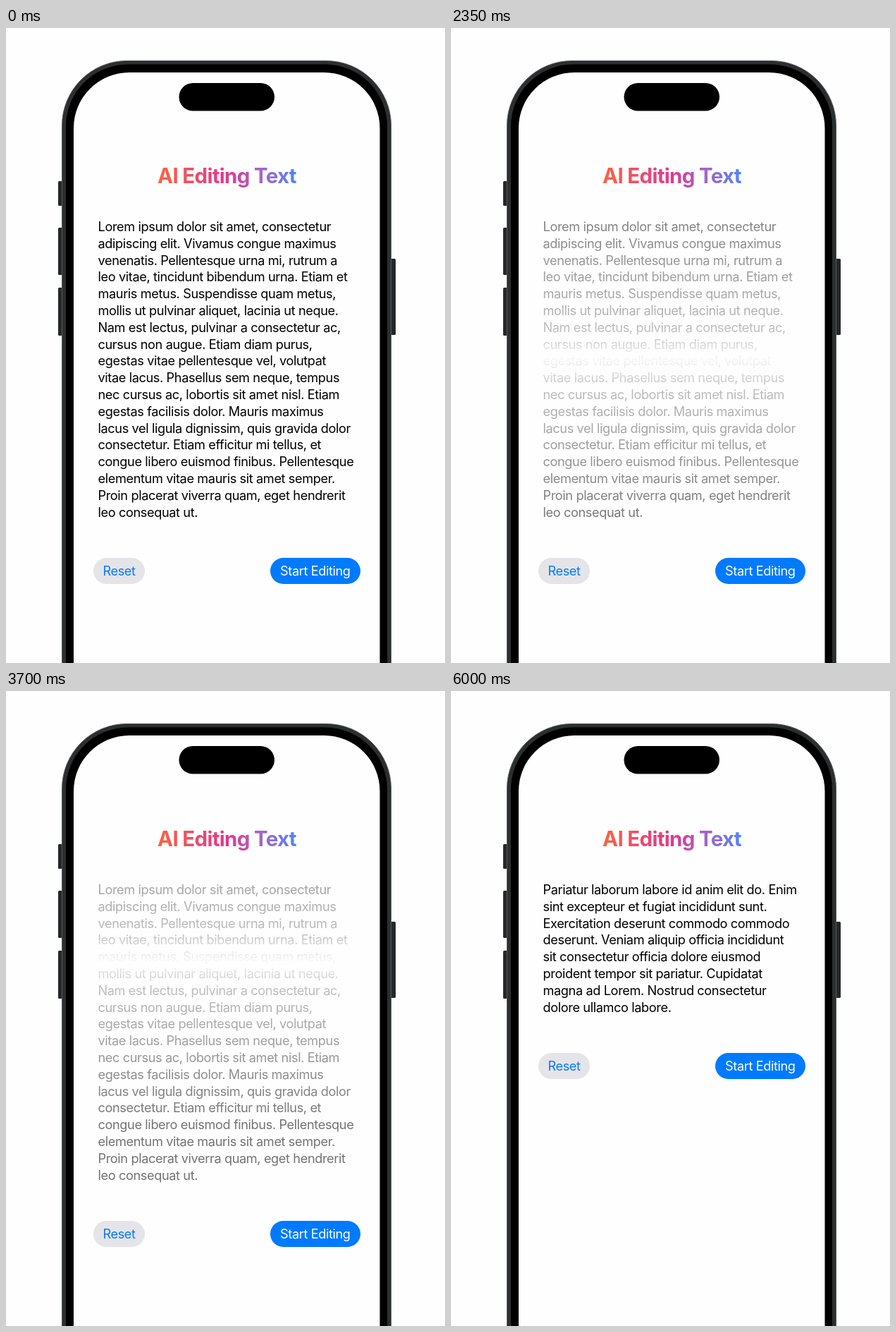
Recreate the animation shown at these times as an HTML page. Size 623 by 900 pixels, loop 6.15 s.

```html
<!DOCTYPE html>
<html lang="en">
<head>
<meta charset="utf-8">
<title>AI Editing Text</title>
<style>
  html, body { margin: 0; width: 100%; height: 100%; overflow: hidden; background: #fefefe; }
  svg { display: block; width: 623px; height: 900px; }
  text { font: 18.2px Inter, "Liberation Sans", sans-serif; letter-spacing: -.4px; }
  .title { font-size: 29.5px; font-weight: 700; letter-spacing: -.7px; }
  .mid { text-anchor: middle; }
</style>
</head>
<body>
<svg viewBox="0 0 623 900">
  <defs>
    <linearGradient id="rainbow" gradientUnits="userSpaceOnUse" x1="213" x2="414" y1="0" y2="0">
      <stop offset="0" stop-color="#fb6540"/>
      <stop offset=".5" stop-color="#e0388f"/>
      <stop offset=".74" stop-color="#a465c4"/>
      <stop offset="1" stop-color="#4b86fb"/>
    </linearGradient>
    <linearGradient id="shimmer" gradientUnits="userSpaceOnUse" x1="0" x2="0" y1="-230" y2="230"/>
    <radialGradient id="reveal" gradientUnits="userSpaceOnUse" cx="320" cy="-910" r="910"/>
  </defs>

  <g fill="#25282a">
    <rect x="74" y="217" width="8" height="35" rx="1.5"/>
    <rect x="74" y="283" width="8" height="67" rx="1.5"/>
    <rect x="74" y="368" width="8" height="68" rx="1.5"/>
    <rect x="545" y="327" width="8" height="108" rx="1.5"/>
  </g>
  <rect x="79.5" y="46.5" width="467" height="960" rx="92" fill="#2b2f30" stroke="#56595a"/>
  <rect x="85" y="51.5" width="456" height="960" rx="88"/>
  <rect x="96" y="63" width="434.5" height="960" rx="79" fill="#fefefe"/>
  <rect x="245.5" y="78" width="135.5" height="39.5" rx="19.75"/>

  <text class="title mid" x="313.5" y="220" fill="url(#rainbow)">AI Editing Text</text>
  <g id="before" fill="url(#shimmer)"></g>
  <g id="after" fill="url(#reveal)"></g>

  <g id="buttons">
    <rect x="124" y="751" width="73" height="37" rx="18.5" fill="#e4e4e9"/>
    <text class="mid" x="160.5" y="776" fill="#087bf5">Reset</text>
    <rect x="375" y="751" width="128" height="37" rx="18.5" fill="#007aff"/>
    <text class="mid" x="438.8" y="776" fill="#fff">Start Editing</text>
  </g>

  <path id="cursor" d="M0 0V21L4.8 16.6L8.4 25L12 23.4L8.5 15.2H14.8Z"
        stroke="#fff" stroke-width="1.6" paint-order="stroke"
        style="filter:drop-shadow(0 1px 1px #0005)"/>
</svg>
<script>
const LOOP = 6150, CLICK = 1625, SWAP = 3850, SWEEP = 1500, LINE = 23.8;
const $ = id => document.getElementById(id);

const before = `Lorem ipsum dolor sit amet, consectetur
adipiscing elit. Vivamus congue maximus
venenatis. Pellentesque urna mi, rutrum a
leo vitae, tincidunt bibendum urna. Etiam et
mauris metus. Suspendisse quam metus,
mollis ut pulvinar aliquet, lacinia ut neque.
Nam est lectus, pulvinar a consectetur ac,
cursus non augue. Etiam diam purus,
egestas vitae pellentesque vel, volutpat
vitae lacus. Phasellus sem neque, tempus
nec cursus ac, lobortis sit amet nisl. Etiam
egestas facilisis dolor. Mauris maximus
lacus vel ligula dignissim, quis gravida dolor
consectetur. Etiam efficitur mi tellus, et
congue libero euismod finibus. Pellentesque
elementum vitae mauris sit amet semper.
Proin placerat viverra quam, eget hendrerit
leo consequat ut.`;

const after = `Pariatur laborum labore id anim elit do. Enim
sint excepteur et fugiat incididunt sunt.
Exercitation deserunt commodo commodo
deserunt. Veniam aliquip officia incididunt
sit consectetur officia dolore eiusmod
proident tempor sit pariatur. Cupidatat
magna ad Lorem. Nostrud consectetur
dolore ullamco labore.`;

function add(parent, tag, attrs) {
  const el = document.createElementNS("http://www.w3.org/2000/svg", tag);
  for (const k in attrs) el.setAttribute(k, attrs[k]);
  return parent.appendChild(el);
}
function paragraph(id, words) {
  words.split("\n").forEach((line, i) =>
    add($(id), "text", { x: 130.5, y: 288 + i * LINE }).textContent = line);
}
paragraph("before", before);
paragraph("after", after);

// [distance from the band centre, opacity]
const band = [[0, .03], [20, .14], [35, .24], [70, .3], [120, .38], [180, .47], [230, .55]];
const bandStops = [...band.slice(1).reverse().map(([d, a]) => [-d, a]), ...band]
  .map(([d, a]) => ({ a, el: add($("shimmer"), "stop", { offset: (d + 230) / 460 }) }));

// [distance behind the reveal front, opacity]
[[150, 1], [130, .93], [105, .66], [82, .5], [58, .36], [34, .25], [12, .13], [0, 0]]
  .forEach(([d, a]) => add($("reveal"), "stop", { offset: 1 - d / 910, "stop-opacity": a }));

const clamp = x => Math.min(1, Math.max(0, x));
const ramp = (t, from, to) => clamp((t - from) / (to - from));
const smooth = x => x * x * (3 - 2 * x);
const mix = (a, b, p) => a + (b - a) * p;

// [time, x, y] of the pointer tip
const track = [[1025, 532, 867], [1400, 475.5, 798], [1550, 449, 776], [1700, 449, 776], [2150, 527, 902]];

function moveCursor(t) {
  const i = track.findIndex(([end]) => t < end);
  $("cursor").style.display = i > 0 ? "" : "none";
  if (i < 1) return;
  const [t0, x0, y0] = track[i - 1], [t1, x1, y1] = track[i];
  const p = ramp(t, t0, t1), e = i === 4 ? smooth(p) : p;
  $("cursor").setAttribute("transform", `translate(${mix(x0, x1, e)} ${mix(y0, y1, e)})`);
}

function draw(t) {
  moveCursor(t);

  const dim = ramp(t, CLICK, CLICK + 250);
  const phase = Math.max(0, t - CLICK) % SWEEP / SWEEP;
  $("shimmer").setAttribute("gradientTransform", `translate(0 ${mix(184, 786, smooth(phase))})`);
  bandStops.forEach(s => s.el.setAttribute("stop-opacity", mix(1, s.a, dim)));
  $("before").style.opacity = 1 - ramp(t, SWAP, SWAP + 250);

  $("after").style.display = t < SWAP ? "none" : "";
  const front = 410 + (t - 4250) * .38;
  $("reveal").setAttribute("gradientTransform", `translate(0 ${Math.min(front, 660)})`);

  const rise = smooth(ramp(t, SWAP, SWAP + 350));
  $("buttons").setAttribute("transform", `translate(0 ${-10 * LINE * rise})`);
}

function tick() {
  draw(performance.now() % LOOP);
  requestAnimationFrame(tick);
}
tick();
</script>
</body>
</html>
```
